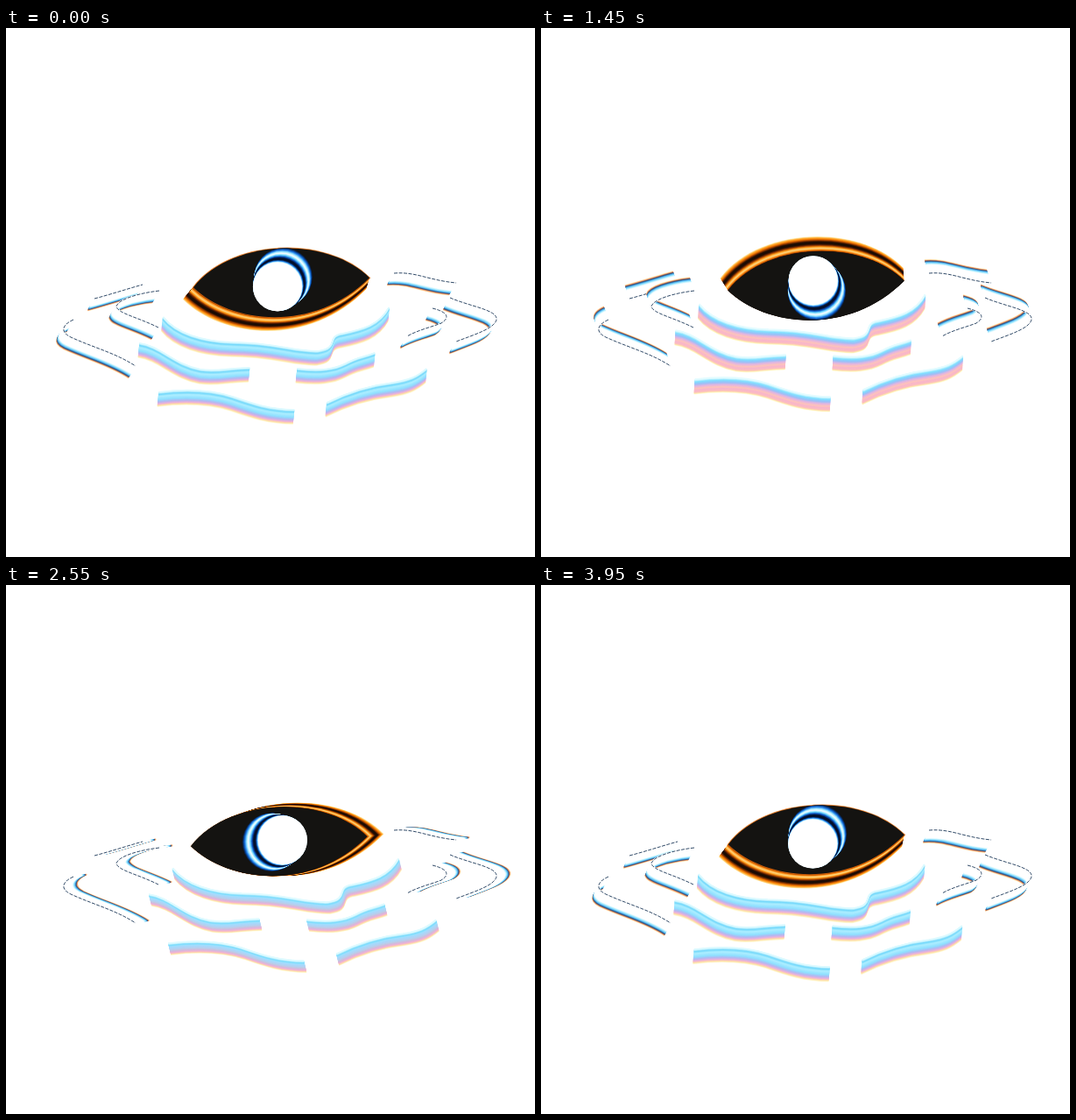
Write an HTML page with a canvas that moves like this. It is 604x604 px and loops after 4 s.

```html
<!DOCTYPE html>
<html lang="en">
<head>
<meta charset="utf-8">
<title>Eye over ripples</title>
<style>
  html, body { margin: 0; width: 100%; height: 100%; overflow: hidden; background: #fff; }
  canvas { display: block; width: 604px; height: 604px; }
</style>
</head>
<body>
<canvas id="stage" width="604" height="604"></canvas>
<script>
const ctx = document.getElementById('stage').getContext('2d');
const LOOP = 4000, STEP = 50, DEPTH = 16;
const clamp = v => Math.max(0, Math.min(1, v));
const lerp = (a, b, k) => a + (b - a) * k;

// A ramp is written as "position:rrggbb ..." and returns [r, g, b] for 0..1.
function ramp(text) {
  const stops = text.split(' ').map(part => {
    const [at, hex] = part.split(':');
    return { at: +at, rgb: [0, 2, 4].map(i => parseInt(hex.slice(i, i + 2), 16)) };
  });
  return k => {
    const i = Math.max(1, stops.findIndex(s => s.at >= k));
    const a = stops[i - 1], b = stops[i];
    const f = clamp((k - a.at) / (b.at - a.at));
    return a.rgb.map((v, n) => lerp(v, b.rgb[n], f));
  };
}
const css = rgb => `rgb(${rgb.map(Math.round).join()})`;
const mix = (a, b, k) => a.map((v, i) => lerp(v, b[i], k));

const lidRamp = ramp('0:120b06 .05:a03c00 .12:ff8c10 .22:ffdc88 .32:ff9410 .42:8a3000 .52:1c0c04 .65:1c0c04 .74:8a3400 .83:ee7400 .91:ffa428 1:fff0b8');
const irisRamp = ramp('0:ffffff .04:a8ecff .1:1878e8 .18:04102c .3:04102c .4:0c58c8 .5:6cd8ff .61:ffffff .71:a4ecff .83:1878e8 .94:062860 1:141311');
// Ribbon ramps run from the upper edge to the lower edge.
const ribbonDown = ramp('0:dcfaff .12:6ed6fa .26:aeeeff .5:8ee0ff .66:b4b6f0 .8:f0b0d8 .91:ffe0a0 1:fffce0');
const ribbonUp = ramp('0:e4fcff .14:80e0ff .3:98c0f8 .45:e4b4e0 .62:ffc4b8 .72:f8b4cc .88:fcc0bc .95:fff0a8 1:fffce0');
const threadRamp = ramp('0:ffffff .6:ffffff .7:a0eaff .8:48aef0 .87:24406c .94:ff9054 1:fff4cc');

const lid = new Path2D('M213 298 C255 243 365 238 414 287 C350 351 255 339 213 298Z');
const iris = new Path2D();
iris.arc(312, 292, 28, 0, 7);

const ribbons = [
  'M183 331 C198 350 228 359 262 360 C310 360 335 371 360 370 C386 366 368 353 388 350 C412 345 430 340 441 320',
  'M156 361 C180 364 196 386 226 391 C245 394 260 389 282 389',
  'M336 390 C362 393 378 391 392 384 C404 377 412 377 425 372',
  'M178 417 C210 413 240 415 262 422 C285 430 305 437 333 437',
  'M370 429 C396 416 420 409 446 406 C464 403 472 400 484 390'
].map(d => new Path2D(d));

const threads = [
  'M77 333 C66 338 60 346 74 353 C100 365 125 371 148 386',
  'M101 309 C120 304 138 298 156 293',
  'M175 300 C150 303 128 310 126 318 C128 326 150 330 174 342',
  'M443 280 C468 278 482 288 514 291',
  'M507 308 C530 318 562 322 560 333 C558 343 535 350 514 358',
  'M487 320 C503 324 508 330 497 337 C484 342 470 345 458 352'
].map(d => new Path2D(d));

function at(x, y, paint) {
  ctx.save();
  ctx.translate(x, y);
  paint();
  ctx.restore();
}

// Sweeps a shape from its far end (k = 1) to its near end (k = 0).
function sweep(steps, from, to, paint) {
  for (let i = steps; i >= 0; i--) {
    const k = i / steps;
    at(lerp(from[0], to[0], k), lerp(from[1], to[1], k), () => paint(k));
  }
}

function strokeIn(path, color, width) {
  ctx.strokeStyle = color;
  ctx.lineWidth = width;
  ctx.stroke(path);
}

function fillIn(path, color) {
  ctx.fillStyle = color;
  ctx.fill(path);
}

function growAbout(x, y, sx, sy) {
  ctx.translate(x, y);
  ctx.scale(sx, sy);
  ctx.translate(-x, -y);
}

function drawRibbon(path, dx, dy, down) {
  const half = 6 + 0.15 * Math.abs(dy), shear = 0.1 * dx;
  at(0.55 * dx, 0.5 * dy, () =>
    sweep(28, [-shear, -half], [shear, half], k =>
      strokeIn(path, css(mix(ribbonUp(k), ribbonDown(k), down)), 1.8)));
}

function drawThread(path, depth) {
  sweep(26, [0, 0], depth, k => strokeIn(path, css(threadRamp(k)), 1.6));
  ctx.setLineDash([4, 1.5]);
  strokeIn(path, '#1c3858', 0.9);
  ctx.setLineDash([]);
}

function drawEye(dx, dy) {
  const near = [-0.12 * dx, -0.12 * dy];
  sweep(48, near, [0.85 * dx, 0.85 * dy], k => {
    growAbout(313, 292.5, 1 + 0.04 * k, 1 + 0.06 * k);
    fillIn(lid, css(lidRamp(k)));
  });
  at(...near, () => {
    const rim = clamp(0.35 + dy / DEPTH);
    strokeIn(lid, `rgba(224,104,8,${rim * 0.8})`, 2);
    fillIn(lid, '#141311');
    ctx.clip(lid);
    ctx.translate(-near[0], -near[1]);
    sweep(40, [0.25 * dx, 0.25 * dy], [-0.6 * dx, -0.6 * dy], k => {
      growAbout(312, 292, 1 + 0.19 * k, 1 + 0.19 * k);
      fillIn(iris, css(irisRamp(k)));
    });
  });
}

function draw(time) {
  const angle = (time - 660) / LOOP * 2 * Math.PI;
  const ux = -Math.cos(angle), uy = -Math.sin(angle);
  const depth = [DEPTH * ux, DEPTH * uy];
  const down = clamp(0.5 + 0.8 * uy + 0.25 * ux);
  ctx.fillStyle = '#fff';
  ctx.fillRect(0, 0, 604, 604);
  threads.forEach(path => drawThread(path, depth));
  ribbons.forEach(path => drawRibbon(path, ...depth, down));
  drawEye(...depth);
}

const start = performance.now();
let shown = -1;
function tick() {
  const time = Math.floor((performance.now() - start) % LOOP / STEP) * STEP;
  if (time !== shown) draw(shown = time);
  requestAnimationFrame(tick);
}
tick();
</script>
</body>
</html>
```
